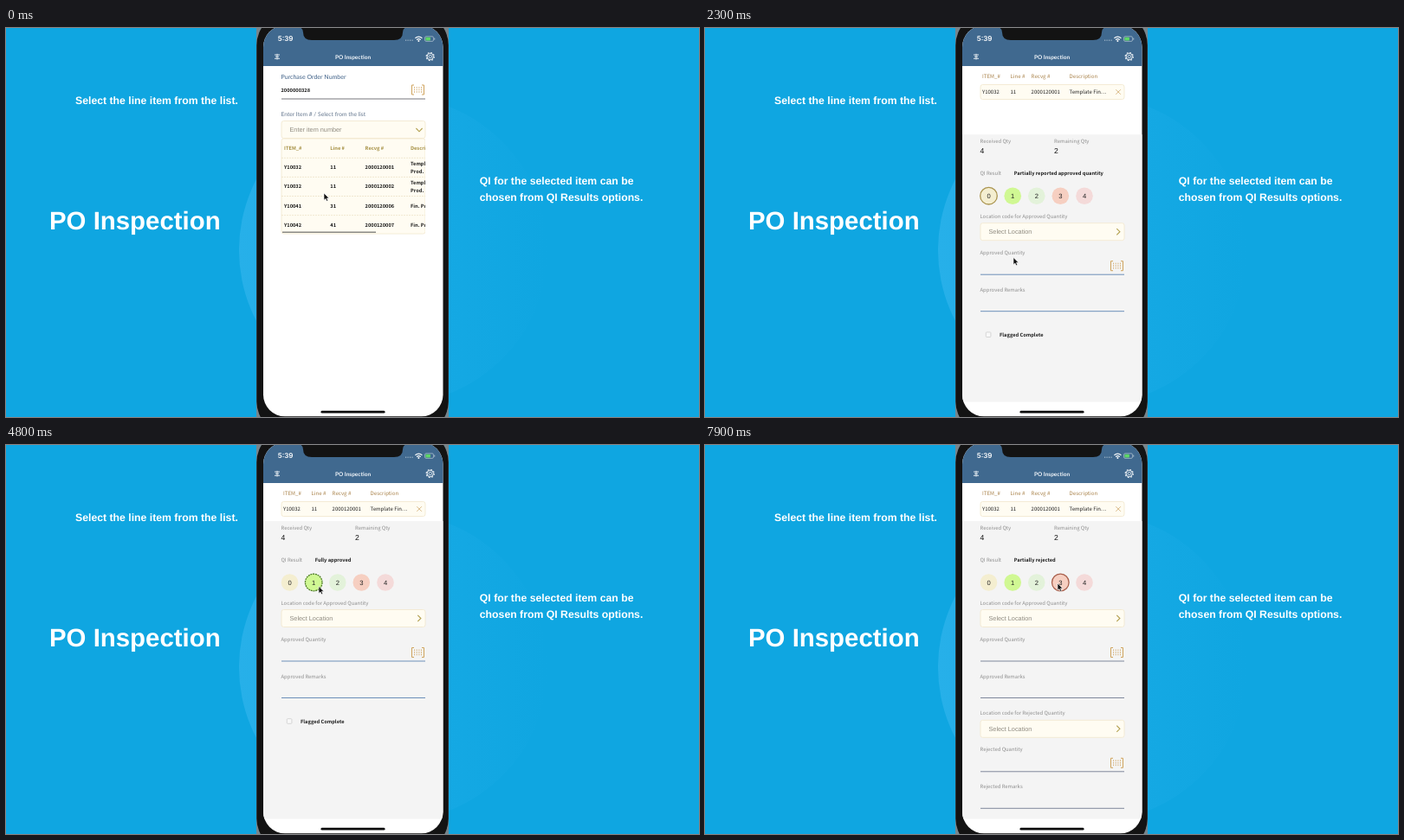
An HTML page for the animation above (8 s loop, 800x450 px).

```html
<!DOCTYPE html>
<html lang="en">
<head>
<meta charset="utf-8">
<title>PO Inspection</title>
<style>
html, body { margin: 0; width: 100%; height: 100%; overflow: hidden; background: #0fa6e1; }
svg { display: block; width: 100%; height: 100%; }
text { text-rendering: geometricPrecision; white-space: pre; }
.big { font: 700 29.4px "Liberation Sans", sans-serif; fill: #fff; }
.note { font: 700 12.25px "Liberation Sans", sans-serif; fill: #fff; }
.clock { font: 600 8px Inter, sans-serif; fill: #fff; }
.title { font: 700 6.5px Lato, sans-serif; fill: #f2f6fa; text-anchor: middle; }
.lead { font: 400 7.05px Lato, sans-serif; fill: #3d5f86; }
.sub { font: 400 6.7px Lato, sans-serif; fill: #66788f; }
.hint { font: 400 7.3px "Liberation Sans", sans-serif; fill: #8f8b80; }
.num { font: 400 8.6px "Liberation Sans", sans-serif; fill: #111; }
.mid { font: 400 7.6px "Liberation Sans", sans-serif; fill: #222; text-anchor: middle; }
.bold, .gold, .label, .cell, .head { font-family: "Noto Sans CJK JP", "Noto Sans CJK SC", "Noto Sans CJK", sans-serif; }
.bold { font-size: 5.7px; font-weight: 700; fill: #1b1b1b; }
.gold { font-size: 5.7px; font-weight: 700; fill: #a58f42; }
.label { font-size: 5.9px; font-weight: 500; fill: #8d8d8d; }
.cell { font-size: 6px; font-weight: 500; fill: #222; }
.head { font-size: 6.1px; font-weight: 500; fill: #a9824a; }
</style>
</head>
<body>
<svg id="stage" viewBox="0 0 800 450" preserveAspectRatio="none"></svg>
<script>
const LOOP = 8000;
const stage = document.getElementById('stage');

const text = (cls, x, y, s) => `<text class="${cls}" x="${x}" y="${y}">${s}</text>`;
const rect = (x, y, w, h, fill, more = '') =>
  `<rect x="${x}" y="${y}" width="${w}" height="${h}" fill="${fill}" ${more}/>`;
const path = (d, color, width = 1, more = '') =>
  `<path d="${d}" fill="none" stroke="${color}" stroke-width="${width}" ${more}/>`;
const group = (id, body, more = '') => `<g id="${id}" ${more}>${body}</g>`;
const rule = (y, more = '') => path(`M318 ${y}H484`, '#77777c', 1, more);

const scanIcon = y => path(`M471 ${y - 5.5}H468.5V${y + 5.5}H471M480 ${y - 5.5}H482.5V${y + 5.5}H480`, '#cfa35c', 1) +
  path([471.5, 474.2, 476.9, 479.5].map(x => `M${x} ${y - 3.5}v7`).join(''), '#d6b27a', 1, 'stroke-dasharray="1.6 1"');

const box = (y, h) => rect(318, y, 166, h, '#fffcf2', 'rx="2.5" stroke="#f1e7cd" stroke-width=".8"');

const picker = y => box(y - 10, 20) + text('hint', 327.5, y + 2.6, 'Select Location') +
  path(`M475.3 ${y - 3.6}l3.6 3.6l-3.6 3.6`, '#b3a04f', 1.1);

// One block of location, quantity and remarks
const fields = (kind, y) =>
  text('label', 317.5, y + 2, `Location code for ${kind} Quantity`) + picker(y + 18) +
  text('label', 317.5, y + 44, `${kind} Quantity`) + scanIcon(y + 57.5) + rule(y + 67.5, 'class="rule"') +
  text('label', 317.5, y + 87, `${kind} Remarks`) + rule(y + 110, 'class="rule"');

const options = [
  { x: 327.5, fill: '#f4eed0', line: '#ab9550', note: 'Partially reported approved quantity' },
  { x: 355.2, fill: '#d0f893', line: '#4d7d24', note: 'Fully approved', dash: '2 .8' },
  { x: 382.8, fill: '#e3f2da', line: '#74a44c', note: 'Approved with remarks' },
  { x: 410.3, fill: '#f6cfc1', line: '#a9604c', note: 'Partially rejected' },
  { x: 438, fill: '#f4dad9', line: '#b06060', note: '' }
];

const rows = [['Y10032', 11, '2000120001'], ['Y10032', 11, '2000120002'],
  ['Y10041', 31, '2000120006'], ['Y10042', 41, '2000120007']];

const listRow = ([item, line, recvg], i) => {
  const y = 163.3 + i * 22.1;
  const about = i < 2
    ? text('bold', 467, y - 4, 'Template Fin.') + text('bold', 467, y + 4.2, 'Prod.')
    : text('bold', 467, y, 'Fin. Prod.');
  return text('bold', 321, y, item) + text('bold', 374.3, y, line) + text('bold', 414.6, y, recvg) + about +
    path(`M318 ${y - 13}H484`, '#ece2c8', .8, 'stroke-dasharray="2 1"');
};

const list =
  text('lead', 317.5, 59, 'Purchase Order Number') + text('bold', 317.5, 73.6, '2000000328') +
  scanIcon(71.5) + rule(82) +
  group('entry', text('sub', 317.5, 101.8, 'Enter Item # / Select from the list') + box(107.5, 20) +
    text('hint', 327.5, 120.3, 'Enter item number') + path('M473.4 116l3.6 3.8l3.6-3.8', '#b3a04f', 1.1)) +
  `<g clip-path="url(#tableClip)">` + box(128, 110) +
  text('gold', 321, 141.4, 'ITEM_#') + text('gold', 374.3, 141.4, 'Line #') +
  text('gold', 414.6, 141.4, 'Recvg #') + text('gold', 467, 141.4, 'Description') +
  rows.map(listRow).join('') + '</g>' +
  group('bar', path('M319 236.3H427', '#8a8a86', 1.4));

const form =
  `<g clip-path="url(#formClip)">` + group('scroll',
    rect(297, 88, 208, 400, '#f4f4f4') +
    text('label', 317.5, 97.6, 'Received Qty') + text('label', 403, 97.6, 'Remaining Qty') +
    text('num', 317.5, 110.2, 4) + text('num', 403, 110.2, 2) +
    text('label', 317.5, 135, 'QI Result') + '<text id="note" class="bold" x="356.7" y="135"/>' +
    options.map((o, i) =>
      `<circle class="opt" cx="${o.x}" cy="159" r="9.8" fill="${o.fill}" stroke="${o.line}"
        stroke-dasharray="${o.dash || 'none'}"/>` + text('mid', o.x, 161.7, i)).join('') +
    fields('Approved', 182.5) +
    group('done', rect(324.3, 316.7, 5.6, 5.6, '#f8f8f8', 'rx=".8" stroke="#cfcfcf" stroke-width=".8"') +
      text('bold', 340, 321.8, 'Flagged Complete')) +
    group('reject', fields('Rejected', 310.3))) + '</g>' +
  text('head', 320, 57.6, 'ITEM_#') + text('head', 352.5, 57.6, 'Line #') +
  text('head', 376.6, 57.6, 'Recvg #') + text('head', 420.6, 57.6, 'Description') +
  box(65.5, 17) +
  text('cell', 320, 76.2, 'Y10032') + text('cell', 352.5, 76.2, 11) +
  text('cell', 376.6, 76.2, '2000120001') + text('cell', 420.6, 76.2, 'Template Fin....') +
  path('M474.3 71.2l5.6 5.6m0-5.6l-5.6 5.6', '#d2ac72', .8);

const header = rect(297, -4, 208, 48, '#40698f') + text('title', 400.5, 36, 'PO Inspection') +
  path('M310 31h6M311 33.2h4M310 35.4h6M313 29.8v6.8', '#eef3f7', .9) +
  '<g fill="none" stroke="#eef3f7"><circle cx="489.7" cy="33" r="3.7"/><circle cx="489.7" cy="33" r="1.7" stroke-width=".8"/>' +
  '<circle cx="489.7" cy="33" r="4.6" stroke-width="1.1" stroke-dasharray="1.8 1.81"/></g>';

const status = text('clock', 313.8, 15.3, '5:39') +
  path('M461 14.2h9', '#b8cad8', 1, 'stroke-dasharray="1.2 1.3"') +
  path('M472.4 11.8q4-3.2 8 0M474 13.6q2.4-1.9 4.8 0', '#fff', 1.2) +
  '<circle cx="476.4" cy="15" r="1" fill="#fff"/>' +
  rect(483.5, 9.8, 10, 5.6, 'none', 'rx="1.5" stroke="#b5c6d4" stroke-width=".7"') +
  rect(484.4, 10.7, 5.5, 3.8, '#5fd768', 'rx=".7"') + rect(494.3, 11.6, .9, 2, '#b5c6d4');

const spinner = Array.from({ length: 8 }, (_, i) =>
  `<path d="M0-2.8V-5" stroke="#fff" stroke-width="1.1" stroke-linecap="round"
    opacity="${.2 + i * .09}" transform="rotate(${i * 45})"/>`).join('');

stage.innerHTML = `
<defs>
  <clipPath id="screenClip"><rect x="297" y="-3" width="207.5" height="452.3" rx="25"/></clipPath>
  <clipPath id="tableClip"><rect x="317" y="127" width="167" height="112"/></clipPath>
  <clipPath id="formClip"><rect x="297" y="84" width="208" height="348.5"/></clipPath>
  <linearGradient id="glow">
    <stop stop-color="#27b0e9"/><stop offset=".6" stop-color="#16a9e4"/><stop offset="1" stop-color="#0fa6e1"/>
  </linearGradient>
</defs>
${rect(0, 0, 800, 450, '#0fa6e1')}
<circle cx="447" cy="257" r="178" fill="url(#glow)"/>
${text('big', 50, 233, 'PO Inspection')}
${text('note', 80, 88.2, 'Select the line item from the list.')}
${text('note', 546.8, 180.8, 'QI for the selected item can be')}
${text('note', 546.8, 199.8, 'chosen from QI Results options.')}
${rect(289, 0, 222, 450, '#77858c')}
${rect(289.3, -18, 221.5, 488, '#131313', 'rx="38"')}
<g clip-path="url(#screenClip)">
  ${rect(297, -4, 208, 455, '#fff')}
  ${group('list', list)}${group('form', form)}${header}
  ${group('busy', rect(297, -4, 208, 455, 'rgba(75,75,75,.49)') + group('spin', spinner))}
  ${status}
</g>
<path d="M338-1H463Q458 0 458 5Q458 14 448 14H353Q343 14 343 5Q343 0 338-1Z" fill="#131313"/>
${rect(363.5, 442.8, 74, 2.7, '#0c0c0c', 'rx="1.35"')}
<path id="cursor" d="M0 0V8.2L1.9 6.5L3.2 9.3L4.7 8.6L3.4 5.9H6Z" fill="#111" stroke="#fff" stroke-width=".6"/>`;

const el = id => document.getElementById(id);
const rules = stage.querySelectorAll('.rule');
const rings = stage.querySelectorAll('.opt');
const show = (id, on) => el(id).setAttribute('display', on ? 'inline' : 'none');
const move = (id, x, y, turn = 0) => el(id).setAttribute('transform', `translate(${x} ${y}) rotate(${turn})`);
const ease = p => p * p * (3 - 2 * p);

// Each entry: time, then values
function track(keys, t) {
  const i = keys.findIndex(k => k[0] > t);
  if (i < 0) return keys[keys.length - 1].slice(1);
  const a = keys[i - 1], b = keys[i], p = ease((t - a[0]) / (b[0] - a[0]));
  return a.slice(1).map((v, n) => v + (b[n + 1] - v) * p);
}

const pointer = [[0, 367, 191], [350, 359, 166], [1600, 359, 166], [2200, 356, 265.5], [2400, 356, 265.5],
  [2750, 356, 231], [3000, 365, 197], [3400, 365, 197], [3600, 355, 152.5], [4100, 355, 152.5], [4600, 361, 163.5],
  [5700, 361, 163.5], [6100, 384, 155], [6500, 387, 152.5], [7300, 387, 152.5], [7600, 407, 160]];
const scrolling = [[0, 35.2], [2400, 35.2], [2750, 0]];

function draw(t) {
  const loaded = t >= 1500, busy = t >= 500 && !loaded;
  const pick = t < 4000 ? 0 : t < 6100 ? 1 : t < 7600 ? 2 : 3;
  show('list', !loaded);
  show('form', loaded);
  show('busy', busy);
  show('entry', !busy);
  show('bar', !busy);
  show('done', pick < 3);
  show('reject', pick === 3);
  move('spin', 400.5, 227.3, Math.floor(t / 100) * 45);
  move('scroll', 0, track(scrolling, t)[0]);
  move('cursor', ...track(pointer, t));
  el('note').textContent = options[pick].note;
  rings.forEach((r, i) => r.setAttribute('stroke-width', i === pick ? 1.3 : 0));
  rules.forEach(r => r.setAttribute('stroke', pick < 2 ? '#6c8fb9' : '#7f889c'));
}

function tick(now) {
  draw(now % LOOP);
  requestAnimationFrame(tick);
}
draw(0);
requestAnimationFrame(tick);
</script>
</body>
</html>
```
